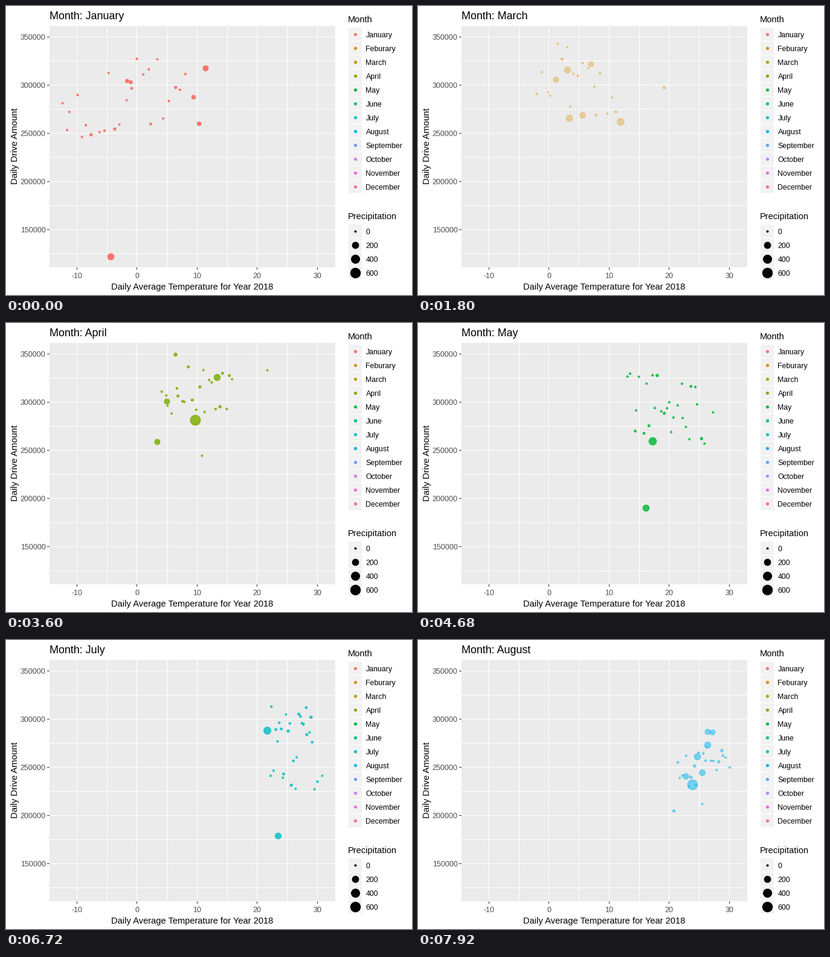
A matplotlib script for the animation above (8000 ms loop, 672x480 px).

```python
import math
import random

import matplotlib.pyplot as plt
from matplotlib.animation import FuncAnimation
from matplotlib.patches import Rectangle

W, H, DPI = 672, 480, 100
PX = 72 / DPI  # points per pixel
LOOP, TICK, STEP = 8000, 40, 120
LEFT, TOP, RIGHT, BOTTOM = 72, 33, 545, 434

MONTHS = ["January", "Feburary", "March", "April", "May", "June", "July",
          "August", "September", "October", "November", "December"]
COLORS = ["#F8766D", "#DE8C00", "#B79F00", "#7CAE00", "#00BA38", "#00C08B",
          "#00BFC4", "#00B4F0", "#619CFF", "#C77CFF", "#F564E3", "#FF64B0"]

# Start (ms) and number of steps of each change to the next month
CHANGES = [(360, 6), (1440, 6), (2520, 6), (3600, 6),
           (4680, 6), (5760, 5), (6720, 5), (7680, 6)]

plt.rcParams["font.family"] = "Liberation Sans"
fig = plt.figure(figsize=(W / DPI, H / DPI), dpi=DPI, facecolor="white")
ax = fig.add_axes([0, 0, 1, 1])
ax.set_xlim(0, W)
ax.set_ylim(H, 0)
ax.axis("off")


def box(x, y, w, h, color):
    ax.add_patch(Rectangle((x, y), w, h, facecolor=color, linewidth=0,
                           antialiased=False))


def label(x, y, text, size, color="black", **kw):
    return ax.text(x, y, text, fontsize=size * PX, color=color,
                   va="baseline", **kw)


def dots(days, color):
    """Filled and outlined circles from (x, y, radius) in stage pixels."""
    return ax.scatter([x + 0.5 for x, _, _ in days],
                      [y + 0.5 for _, y, _ in days],
                      s=[((2 * r - 1) * PX) ** 2 for _, _, r in days],
                      facecolors=color, edgecolors=color, linewidths=PX,
                      zorder=3)


def draw_panel():
    box(LEFT, TOP, RIGHT - LEFT, BOTTOM - TOP, "#EBEBEB")
    for k in range(9):
        x = math.floor(117.3 + 49.75 * k)
        box(x, TOP, 1, BOTTOM - TOP, "white")
        if k % 2 == 0:
            box(x, BOTTOM, 1, 4, "#333333")
            label(x + 0.5, 452, str(5 * k - 10), 12.5, "#4D4D4D", ha="center")
    for k in range(10):
        y = math.floor(51.3 + 40.05 * k)
        box(LEFT, y, RIGHT - LEFT, 1, "white")
        if k % 2 == 0:
            box(LEFT - 4, y, 4, 1, "#333333")
            label(65.5, y + 5, str(350000 - 25000 * k), 12.5, "#4D4D4D",
                  ha="right")
    label(308, 471, "Daily Average Temperature for Year 2018", 14.6,
          ha="center")
    label(19.5, 233, "Daily Drive Amount", 14.9, ha="center",
          rotation=90, rotation_mode="anchor")


def draw_key(y, radius, color, text):
    box(567, y - 11, 22, 22, "#F2F2F2")
    dots([(577, y - 0.5, radius)], color)
    label(595.5, y + 5, text, 12.4)


def draw_legends():
    label(565.5, 27, "Month", 14.6)
    for i, (name, color) in enumerate(zip(MONTHS, COLORS)):
        draw_key(47 + 23 * i, 2.6, color, name)
    label(565.5, 354, "Precipitation", 14.6)
    for i in range(4):
        draw_key(374 + 23 * i, 2 + 3.87 * math.sqrt(i), "black", str(200 * i))


def cloud(month, count, xs, ys, slope, wet):
    """Dry days spread over a tilted band, plus the wet or extreme days."""
    rng = random.Random(month)
    mid, span = sum(xs) / 2, xs[1] - xs[0]
    days = []
    for i in range(count):
        x = xs[0] + span * (i + rng.random()) / count
        y = rng.uniform(*ys) + slope * (x - mid)
        days.append((x, y, 2 + 0.8 * rng.random() ** 3))
    return dots(days + wet, COLORS[month])


def state(t):
    """Visible month, its opacity and the month named in the title."""
    month, alpha, named = 0, 1.0, 0
    for i, (start, steps) in enumerate(CHANGES):
        if t < start:
            break
        part = ((t - start) // STEP + 1) / steps
        if part >= 1:
            month, alpha, named = i + 1, 1.0, i + 1
        else:
            month, alpha, named = i, 1 - part, i + (part > 0.5)
    return month, alpha, named


draw_panel()
draw_legends()
title = label(72, 22, "", 17.9)

clouds = [
    cloud(0, 23, (93, 300), (92, 210), -0.25,
          [(173, 416, 5.8), (330, 103, 5), (310, 151, 3.8), (319, 195, 3.8),
           (200, 124, 3.5), (206, 126, 3.3), (93, 161, 2)]),
    cloud(1, 18, (195, 330), (68, 175), 0.2,
          [(335, 192, 6.3), (250, 186, 5.9), (247, 106, 5.7),
           (272, 181, 5.4), (228, 122, 5), (286, 96, 4.9), (407, 135, 2.8)]),
    cloud(2, 26, (231, 290), (51, 177), 0,
          [(255, 88, 7.3), (239, 238, 6.8), (233, 317, 5.8),
           (327, 78, 4.2), (241, 120, 3.6)]),
    cloud(3, 22, (256, 376), (70, 150), 0,
          [(313, 161, 9), (349, 90, 5.8), (250, 197, 5), (266, 130, 5),
           (280, 52, 3.3), (432, 78, 2), (324, 220, 2)]),
    cloud(4, 27, (345, 475), (75, 205), 0,
          [(377, 307, 5.8), (388, 196, 6.8), (488, 148, 2)]),
    cloud(5, 24, (392, 495), (98, 185), 0.2,
          [(462, 126, 7), (448, 116, 5), (443, 98, 3.5), (363, 187, 3.5),
           (377, 164, 3.3), (454, 221, 2)]),
    cloud(6, 27, (435, 515), (110, 250), 0,
          [(450, 325, 5.6), (432, 150, 6.5), (523, 225, 2)]),
    cloud(7, 20, (428, 517), (175, 245), -0.4,
          [(454, 240, 8.8), (479, 174, 5.8), (470, 220, 5.4),
           (462, 193.5, 5.8), (443, 226, 5.3), (479, 152, 5),
           (487, 153, 4.8), (423, 283.5, 2.6), (470, 272, 2)]),
]


def update(n):
    month, alpha, named = state(n * TICK)
    for i, points in enumerate(clouds):
        points.set_visible(i == month)
    clouds[month].set_alpha(alpha)
    title.set_text("Month: " + MONTHS[named])
    return clouds + [title]


anim = FuncAnimation(fig, update, frames=LOOP // TICK, interval=TICK,
                     repeat=True, repeat_delay=0)
plt.show()
```
